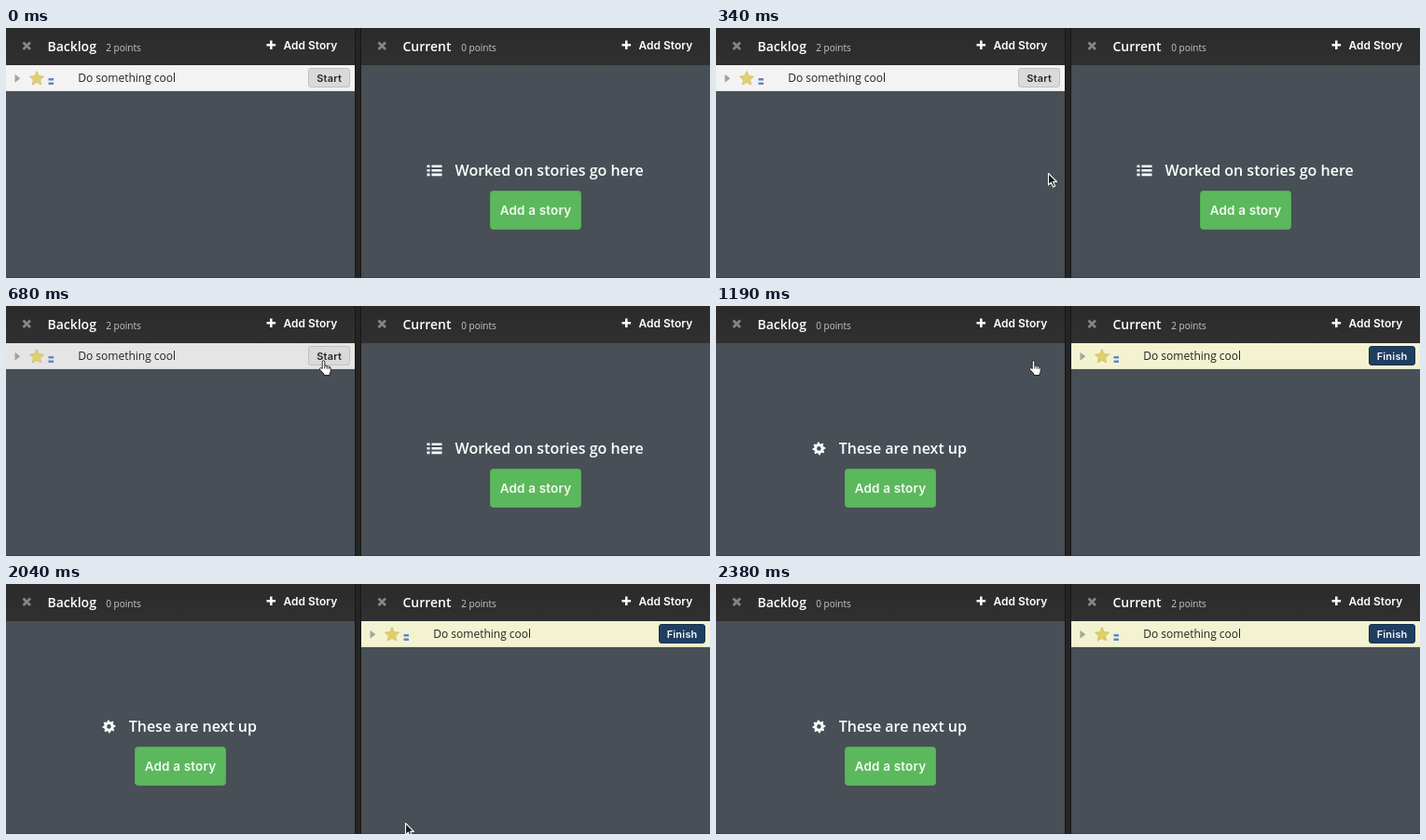
An HTML page for the animation above (2890 ms loop, 755x269 px).

```html
<!DOCTYPE html>
<html lang="en">
<head>
<meta charset="utf-8">
<title>Story board</title>
<style>
  html, body { margin: 0; width: 100%; height: 100%; overflow: hidden; background: #484f56; }
  svg { display: block; width: 755px; height: 269px; }
  text { font-family: "Open Sans", "Noto Sans", sans-serif; white-space: pre; }
  .name { font-size: 14px; font-weight: 600; fill: #fff; }
  .points { font-size: 10px; fill: #c9c9c9; }
  .add, .label, .big { font-family: Inter, "Liberation Sans", sans-serif; font-weight: 600; }
  .add { font-size: 12px; fill: #fff; }
  .label { font-size: 11px; letter-spacing: .2px; text-anchor: middle; }
  .big { font-size: 13.5px; letter-spacing: .15px; fill: #f2faf2; text-anchor: middle; }
  .hint { font-size: 16px; font-weight: 600; fill: #fff; }
  .story { font-size: 12px; fill: #222; }
</style>
</head>
<body>
<svg id="stage" viewBox="0 0 755 269"></svg>
<script>
const RIGHT = 381, LOOP = 2890;

// at: ms, started: story moved to Current, hover: row under pointer
const steps = [
  { at: 0 },
  { at: 340, cursor: "arrow", x: 356, y: 156 },
  { at: 510, cursor: "arrow", x: 347, y: 98 },
  { at: 680, cursor: "hand", x: 336, y: 58, hover: true },
  { at: 1190, cursor: "hand", x: 336, y: 58, started: true },
  { at: 1870, cursor: "arrow", x: 392, y: 62, started: true, hover: true },
  { at: 2040, cursor: "arrow", x: 428, y: 257, started: true },
  { at: 2210, started: true }
];

const ring = (n, radius) => Array.from({ length: n }, (_, i) => {
  const a = i * 2 * Math.PI / n - Math.PI / 2, r = radius(i);
  return (r * Math.cos(a)).toFixed(2) + "," + (r * Math.sin(a)).toFixed(2);
}).join(" ");

const starPoints = ring(10, i => i % 2 ? 3.8 : 8);
const gearPoints = ring(32, i => (i + 1) % 4 < 2 ? 7 : 5.2);

const header = (x, name) => `
  <g transform="translate(${x})">
    <rect width="374" height="40" fill="url(#bar)"/>
    <path d="M18.5 15.5l7.5 7.5m0-7.5l-7.5 7.5" stroke="#858585" stroke-width="2.8"/>
    <text class="name" x="44.4" y="25">${name}</text>
    <text class="points" id="${name}" x="107.3" y="24.5"></text>
    <path d="M279.5 18.2h9.6m-4.8-4.8v9.6" stroke="#fff" stroke-width="2.5"/>
    <text class="add" x="297.5" y="22.7">Add Story</text>
  </g>`;

const row = (id, x, button, bx, bw, fill, edge, ink) => `
  <g id="${id}" transform="translate(${x})">
    <rect class="back" y="40" width="374" height="28"/>
    <path d="M0 67.5h374" stroke="#000" stroke-opacity=".06"/>
    <path d="M9.5 49.8v9l5.8-4.5z" fill="#a3a39f"/>
    <polygon class="star" points="${starPoints}" transform="translate(33 54.6)"
      stroke="#c9bb66" stroke-width=".7" stroke-linejoin="round"/>
    <path d="M45.5 55.3h5.5m-5.5 4.4h5.5" stroke="#6485bd" stroke-width="2.6"/>
    <text class="story" x="77.2" y="58.2">Do something cool</text>
    <rect x="${bx + .5}" y="43.5" width="${bw - 1}" height="20" rx="2.5" fill="${fill}" stroke="${edge}"/>
    <text class="label" x="${bx + bw / 2 + .1}" y="58" fill="${ink}">${button}</text>
  </g>`;

const empty = (id, bx, tx, hint, icon) => `
  <g id="${id}">
    ${icon}
    <text class="hint" x="${tx}" y="158.7">${hint}</text>
    <rect x="${bx + .5}" y="175.5" width="97" height="41" rx="3" fill="#5cb85c" stroke="#55ad55"/>
    <text class="big" x="${bx + 49}" y="201">Add a story</text>
  </g>`;

const listIcon = `<path d="M451.5 148.7h3m-3 4.6h3m-3 4.6h3M456.5 148.7h11m-11 4.6h11m-11 4.6h11"
  stroke="#fff" stroke-width="2.6"/>`;
const gearIcon = `<g transform="translate(110.4 153.4)">
  <polygon points="${gearPoints}" fill="#fff"/><circle r="2.3" fill="#484f56"/></g>`;

const $ = id => document.getElementById(id);

$("stage").innerHTML = `
  <defs><linearGradient id="bar" x2="0" y2="1">
    <stop stop-color="#2b2b2b"/><stop offset="1" stop-color="#303030"/>
  </linearGradient></defs>
  <rect width="755" height="269" fill="#484f56"/>
  ${header(0, "Backlog")}
  ${header(RIGHT, "Current")}
  ${empty("emptyRight", 519, 481.6, "Worked on stories go here", listIcon)}
  ${empty("emptyLeft", 138, 131.7, "These are next up", gearIcon)}
  ${row("rowLeft", 0, "Start", 324, 45, "#dadada", "#c0c0c0", "#262626")}
  ${row("rowRight", RIGHT, "Finish", 319, 50, "#203e61", "#18304d", "#f4f7fb")}
  <rect x="374" width="7" height="269" fill="#242424"/>
  <path d="M374.5 0v269M380.5 0v269" stroke="#171717"/>
  <path d="M0 268.5h374M381 268.5h374" stroke="#3c4046"/>
  <path id="arrow" d="M.5.5v12.4l2.9-2.7 2.1 4.8 2.2-.9-2.1-4.7h3.9z"
    fill="#1c1c1c" stroke="#fff" stroke-width="1.1" stroke-linejoin="round"/>
  <path id="hand" d="M3.2 9.6V2.2q0-1.5 1.3-1.5t1.3 1.5v4.2q1.9-.9 2.4.4
    1.6-.6 2.1.6 1.9-.3 1.9 1.6v2.7q0 1.5-1.1 2.9v1.9H4.9v-1.6
    L.8 10.6q-.9-1.6.4-2 1-.2 2 1zM5.8 6.4v3M8.2 6.8v2.8M10.3 7.4v2.4"
    fill="#fff" stroke="#161616" stroke-width=".9" stroke-linejoin="round"/>`;

const show = (id, on) => { $(id).style.display = on ? "" : "none"; };

function paintRow(id, back, star) {
  $(id).querySelector(".back").setAttribute("fill", back);
  $(id).querySelector(".star").setAttribute("fill", star);
}

function draw(s) {
  const on = !!s.started;
  show("rowLeft", !on);
  show("emptyRight", !on);
  show("rowRight", on);
  show("emptyLeft", on);
  $("Backlog").textContent = on ? "0 points" : "2 points";
  $("Current").textContent = on ? "2 points" : "0 points";
  paintRow("rowLeft", s.hover ? "#e5e5e5" : "#f3f3f3", "#dfd16c");
  paintRow("rowRight", s.hover ? "#ebebc2" : "#f3f3d1", s.hover ? "#ddd28c" : "#dfcf66");
  for (const id of ["arrow", "hand"]) {
    show(id, s.cursor === id);
    if (s.cursor === id) $(id).setAttribute("transform", `translate(${s.x} ${s.y})`);
  }
}

let start, current;
function tick() {
  const now = performance.now();
  start ??= now;
  const t = (now - start) % LOOP;
  const s = steps.findLast(step => step.at <= t);
  if (s !== current) draw(current = s);
  requestAnimationFrame(tick);
}
tick();
</script>
</body>
</html>
```
